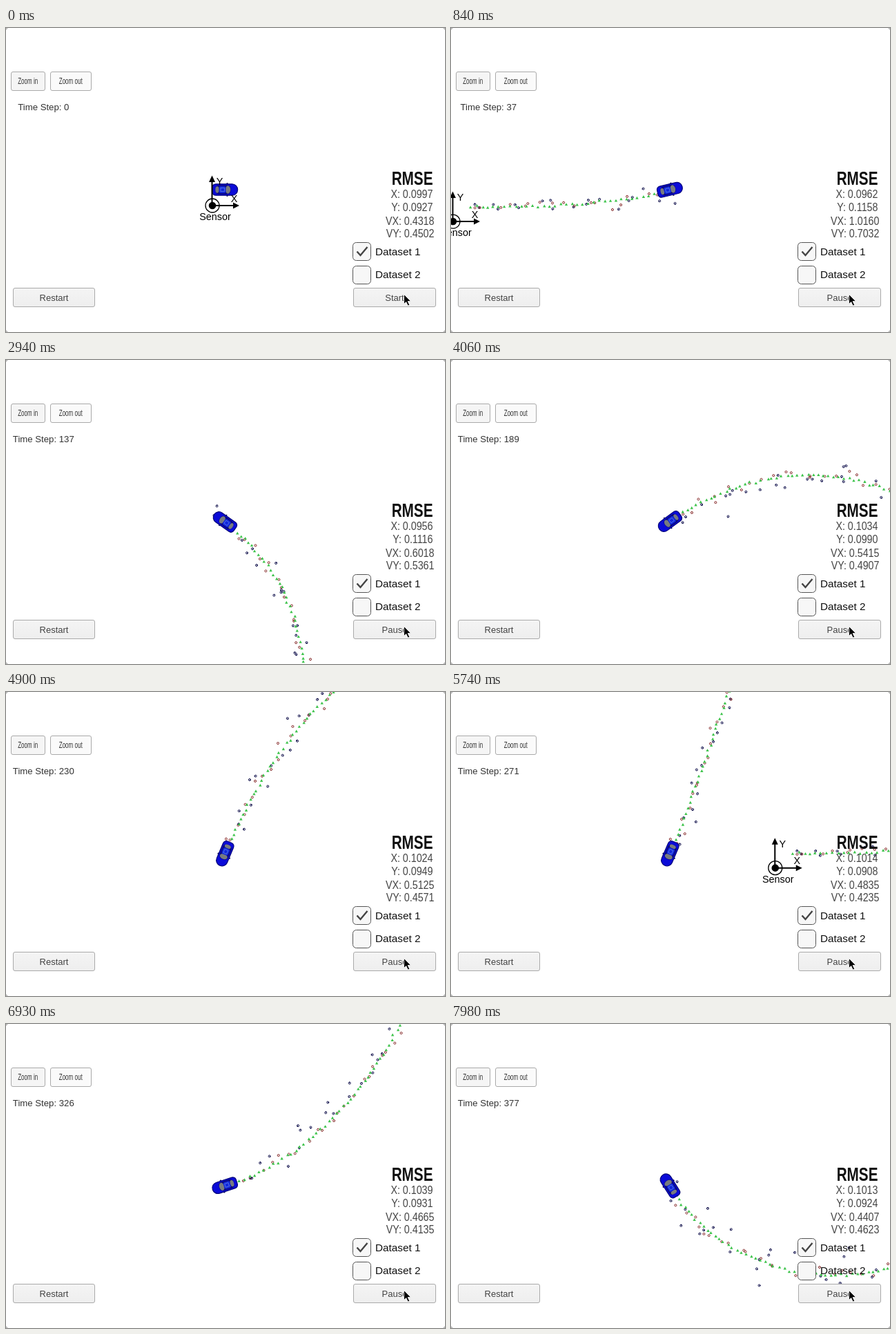
These frames come from a looping animation (636x440 px, 8000 ms). An HTML page with a canvas:

```html
<!DOCTYPE html>
<html lang="en">
<head>
<meta charset="utf-8">
<title>Sensor fusion simulator</title>
<style>
  html, body { margin: 0; width: 100%; height: 100%; overflow: hidden; background: #fff; }
  canvas, svg { position: absolute; left: 0; top: 0; width: 636px; height: 440px; }
  svg { font-family: "Liberation Sans", Arial, sans-serif; }
  .button { stroke: #aaa; fill: url(#face); }
  .box { stroke: #555; fill: #f7f7f7; }
  .label { font-size: 13px; fill: #444; text-anchor: middle; }
  .small { font-size: 12px; fill: #333; text-anchor: middle; }
  .data { font-size: 15.3px; fill: #111; }
  .value { font-size: 16.8px; fill: #444; text-anchor: end; }
  .title { font-size: 28px; font-weight: bold; fill: #111; text-anchor: end; }
</style>
</head>
<body>
<canvas id="scene" width="636" height="440"></canvas>
<svg viewBox="0 0 636 440">
  <defs>
    <linearGradient id="face" x2="0" y2="1">
      <stop stop-color="#f4f4f4"/><stop offset="1" stop-color="#eee"/>
    </linearGradient>
  </defs>
  <path d="M0 0h3L0 3zM636 0h-3l3 3zM0 440h3l-3-3zM636 440h-3l3-3z" fill="#bbb"/>
  <rect class="button" x="7.5" y="63.5" width="49" height="27" rx="2.5" style="fill:#f5f5f5"/>
  <rect class="button" x="64.5" y="63.5" width="59" height="27" rx="2.5" style="fill:#fafafa"/>
  <text class="small" transform="translate(31.7 81) scale(.67 1)">Zoom in</text>
  <text class="small" transform="translate(93.7 81) scale(.67 1)">Zoom out</text>
  <text class="label" id="step" x="54.3" y="119" style="font-size:13.2px;fill:#333"></text>

  <text class="title" transform="translate(618.5 227) scale(.74 1)">RMSE</text>
  <g id="errors">
    <text class="value" transform="translate(618.5 246) scale(.85 1)"></text>
    <text class="value" transform="translate(618.5 265) scale(.85 1)"></text>
    <text class="value" transform="translate(620.5 285) scale(.85 1)"></text>
    <text class="value" transform="translate(620.5 303) scale(.85 1)"></text>
  </g>

  <rect class="box" x="502.5" y="310.5" width="26" height="26" rx="5"/>
  <path d="M508.5 323.5l5 5.5 10-12" fill="none" stroke="#444" stroke-width="2.4"/>
  <rect class="box" x="502.5" y="344.5" width="26" height="26" rx="5"/>
  <text class="data" x="535" y="328.7">Dataset 1</text>
  <text class="data" x="535" y="362">Dataset 2</text>

  <rect class="button" x="10.5" y="376.5" width="118" height="27" rx="2.5"/>
  <text class="label" x="69.5" y="395">Restart</text>
  <rect class="button" x="503.5" y="376.5" width="119" height="27" rx="2.5"/>
  <text class="label" id="run" x="563" y="395"></text>
  <path d="M576.5 385.5v14l3.2-3 2.6 5.5 2.4-1.1-2.6-5.3h4.4z" fill="#000" stroke="#fff" stroke-width=".8"/>
</svg>
<script>
const LOOP = 8000, TICK = 70, STEPS = 380;
const SCALE = 31.1;                 // pixels per metre
const CAR = { x: 317, y: 234 };
const ORIGIN = { x: 317, y: 235.5 };

// [time in ms, simulation step]
const PACE = [[0, 0], [70, 1], [1750, 80], [2940, 137], [4060, 189],
  [5740, 271], [6930, 326], [7980, 377]];
// [step, X, Y, VX, VY]
const RMSE = [[1, .18, .02, 5.2, .002], [4, .14, .08, 2.7, .9], [15, .105, .1, 1.5, .8],
  [40, .095, .118, .95, .69], [80, .0924, .1161, .7075, .602], [137, .0956, .1116, .6018, .5361],
  [189, .1034, .099, .5415, .4907], [271, .1014, .0908, .4835, .4235],
  [326, .1039, .0931, .4665, .4135], [377, .1013, .0924, .4407, .4623]];
const IDLE = [.0997, .0927, .4318, .4502];
const NAMES = ['X', 'Y', 'VX', 'VY'];

const ctx = document.getElementById('scene').getContext('2d');
const stepText = document.getElementById('step');
const runText = document.getElementById('run');
const errorTexts = [...document.getElementById('errors').children];

function sample(keys, at, column = 1) {
  let i = 1;
  while (i < keys.length - 1 && keys[i][0] < at) i++;
  const a = keys[i - 1], b = keys[i];
  const f = Math.min(1, Math.max(0, (at - a[0]) / (b[0] - a[0])));
  return a[column] + (b[column] - a[column]) * f;
}

let seed = 20;
function random() {
  seed = (seed * 16807) % 2147483647;
  return seed / 2147483647;
}
const gauss = () => Math.sqrt(-2 * Math.log(random() + 1e-9)) * Math.cos(2 * Math.PI * random());

const heading = k => 2.192 * (1 - Math.cos(2 * Math.PI * k / 500));
const speed = k => 5 + .2 * Math.cos(2 * Math.PI * k / 250);

// Positions are pixels from the sensor, y pointing up.
function buildTrack() {
  const track = [];
  let x = 18, y = 21.5;
  for (let k = 0; k <= STEPS; k++) {
    const range = Math.hypot(x, y), bearing = Math.atan2(y, x);
    const radar = k % 2 === 1;
    let mx = x + gauss() * 4.6, my = y + gauss() * 4.6;
    if (radar) {
      const r = range + gauss() * 8, a = bearing + gauss() * .03;
      mx = r * Math.cos(a);
      my = r * Math.sin(a);
    }
    track.push({ x, y, radar, mx, my, ex: x + gauss(), ey: y + gauss(), tilt: random() * 6.3 });
    const d = speed(k + .5) * .05 * SCALE, a = heading(k + .5);
    x += d * Math.cos(a);
    y += d * Math.sin(a);
  }
  return track;
}
const track = buildTrack();

function polygon(points, fill) {
  ctx.beginPath();
  points.forEach(([x, y]) => ctx.lineTo(x, y));
  ctx.closePath();
  ctx.fillStyle = fill;
  ctx.fill();
}

function circle(x, y, r) {
  ctx.beginPath();
  ctx.arc(x, y, r, 0, 7);
}

function drawMeasurement(x, y, radar, tilt) {
  ctx.strokeStyle = radar ? '#0c0c48' : '#802020';
  ctx.lineWidth = 1;
  circle(x, y, 1.5);
  ctx.stroke();
  if (!radar) return;
  ctx.beginPath();
  ctx.moveTo(x, y);
  ctx.lineTo(x + 2 * Math.cos(tilt), y + 2 * Math.sin(tilt));
  ctx.stroke();
}

function drawTrail(step, sx, sy) {
  for (let k = 1; k <= step; k++) {
    const p = track[k];
    drawMeasurement(sx + p.mx, sy - p.my, p.radar, p.tilt);
  }
  for (let k = 1; k <= step; k++) {
    const x = sx + track[k].ex, y = sy - track[k].ey;
    polygon([[x, y - 2.1], [x + 2.2, y + 1.8], [x - 2.2, y + 1.8]], '#3cc34a');
  }
}

function drawCar(angle) {
  ctx.save();
  ctx.translate(CAR.x, CAR.y);
  ctx.rotate(-angle);
  ctx.fillStyle = '#06065a';
  ctx.fillRect(2.5, -9.8, 2, 19.6);
  ctx.beginPath();
  ctx.roundRect(-18.2, -8.2, 36.8, 16.4, [5, 8, 8, 5]);
  ctx.fillStyle = '#0b0bd8';
  ctx.fill();
  ctx.strokeStyle = '#06067a';
  ctx.lineWidth = 1.2;
  ctx.stroke();
  ctx.beginPath();
  ctx.roundRect(-13.5, -6.6, 22, 13.2, 5);
  ctx.fillStyle = '#08087a';
  ctx.fill();
  ctx.fillStyle = '#777b80';
  ctx.beginPath();
  ctx.ellipse(4.5, 0, 3.7, 5.7, 0, 0, 7);
  ctx.fill();
  ctx.beginPath();
  ctx.ellipse(-11, 0, 2.7, 4.7, 0, 0, 7);
  ctx.fill();
  ctx.beginPath();
  ctx.roundRect(-8.5, -5, 10, 10, 2.5);
  ctx.fillStyle = '#1226dc';
  ctx.fill();
  ctx.strokeStyle = '#5b83e8';
  ctx.lineWidth = .8;
  ctx.strokeRect(-6, -2.6, 5.5, 5.2);
  ctx.restore();
}

function drawSensor(x, y) {
  ctx.strokeStyle = ctx.fillStyle = '#000';
  ctx.lineWidth = 2;
  ctx.beginPath();
  ctx.moveTo(x - .5, y - 36);
  ctx.lineTo(x - .5, y);
  ctx.lineTo(x + 32, y);
  ctx.stroke();
  polygon([[x - .5, y - 43.5], [x + 4, y - 34], [x - 5, y - 34]], '#000');
  polygon([[x + 39, y], [x + 30, y - 4.5], [x + 30, y + 4.5]], '#000');
  ctx.lineWidth = 1.3;
  circle(x, y, 10);
  ctx.stroke();
  circle(x, y, 5.3);
  ctx.fill();
  ctx.font = '14.4px "Liberation Sans", Arial, sans-serif';
  ctx.textAlign = 'center';
  ctx.fillText('Y', x + 10.5, y - 30);
  ctx.fillText('X', x + 31.5, y - 5.5);
  ctx.fillText('Sensor', x + 4, y + 21);
}

function render(time) {
  const step = Math.round(sample(PACE, time));
  const sx = ORIGIN.x - track[step].x, sy = ORIGIN.y + track[step].y;
  ctx.clearRect(0, 0, 636, 440);
  drawTrail(step, sx, sy);
  drawCar(heading(step));
  drawSensor(sx, sy);
  stepText.textContent = 'Time Step: ' + step;
  runText.textContent = step ? 'Pause' : 'Start';
  errorTexts.forEach((text, i) => {
    const value = step ? sample(RMSE, step, i + 1) : IDLE[i];
    text.textContent = NAMES[i] + ': ' + value.toFixed(4);
  });
}

const start = performance.now();
function frame() {
  const time = (performance.now() - start) % LOOP;
  render(Math.floor(time / TICK) * TICK);
  requestAnimationFrame(frame);
}
frame();
</script>
</body>
</html>
```
